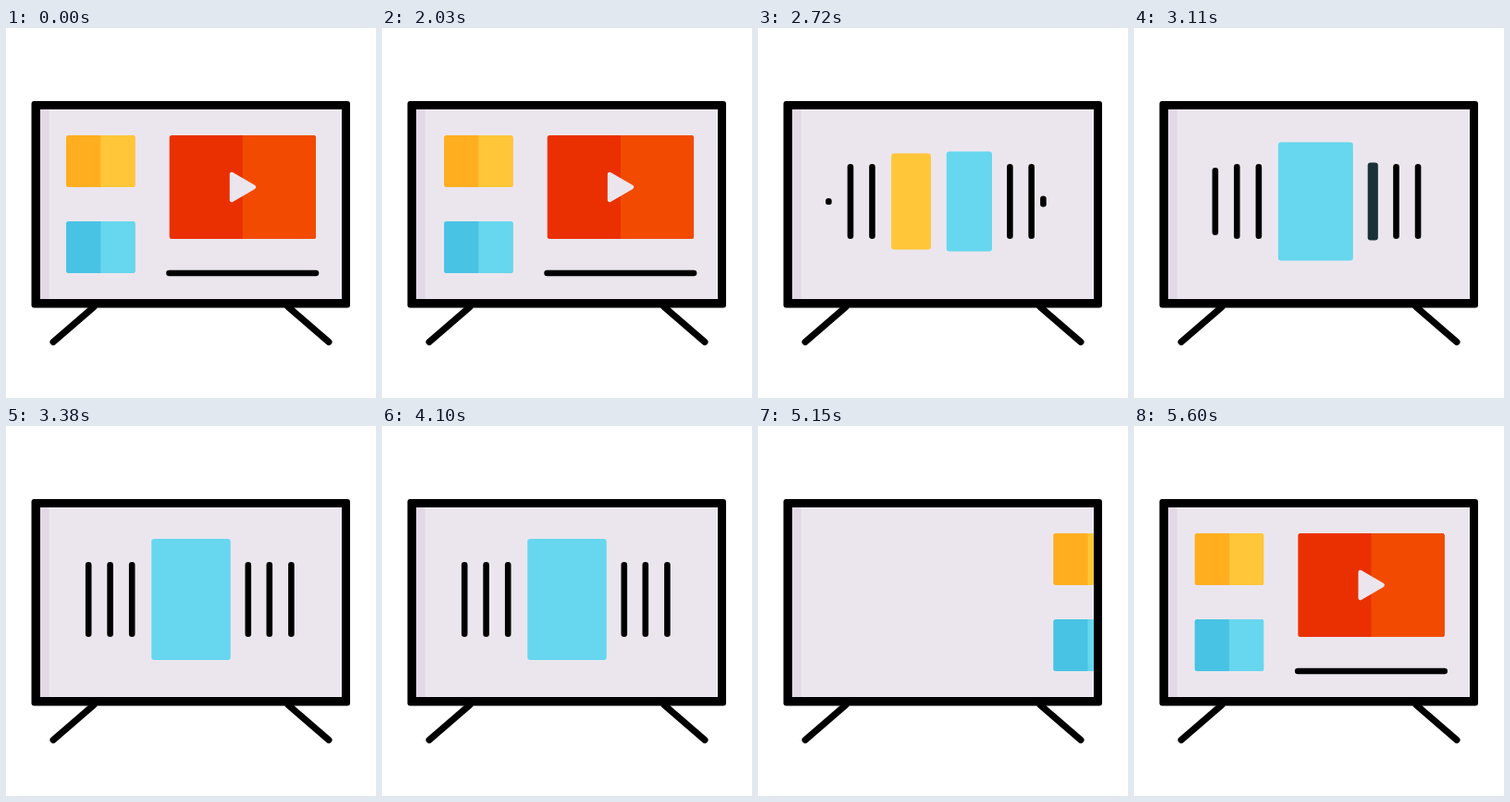
These frames come from a looping animation (400 px wide and 400 px high, 5630 ms). An HTML page:

```html
<!DOCTYPE html>
<html lang="en">
<head>
<meta charset="utf-8">
<title>TV menu</title>
<style>
html, body { margin: 0; width: 100%; height: 100%; overflow: hidden; background: #fff; }
svg { display: block; width: 100%; height: 100%; }
</style>
</head>
<body>
<svg viewBox="0 0 400 400">
  <defs>
    <clipPath id="screen"><rect x="37" y="88" width="326" height="205"/></clipPath>
  </defs>
  <path d="M95 301.5L51 339.5M305 301.5L349 339.5" stroke="#000" stroke-width="7" stroke-linecap="round"/>
  <rect x="27.5" y="79" width="344.5" height="223.5" rx="3"/>
  <rect x="37" y="88" width="326" height="205" fill="#ebe6ee"/>
  <rect x="37" y="88" width="9.5" height="205" fill="#e2d8e6"/>
  <g clip-path="url(#screen)">
    <g id="grid">
      <line x1="176.5" y1="265" x2="335" y2="265" stroke="#000" stroke-width="6.6" stroke-linecap="round"/>
      <path d="M244 158L268 172L244 186Z" fill="#ebe6ee" stroke="#ebe6ee" stroke-width="4.4" stroke-linejoin="round"/>
    </g>
    <g id="carousel"></g>
  </g>
</svg>
<script>
const LOOP = 5630;
const YELLOW = [255, 198, 57], BLUE = [102, 215, 238];
const SLOTS = [65.5, 89.2, 112.6, 136.2, 200, 261.8, 284.8, 308.4, 308.4];
const CENTER = 4, MID_Y = 187.5;
const LINE = { w: 6.6, h: 81 }, CARD = { w: 85.5, h: 131 };
const SCROLLS = [2555, 3065, 3575, 4295], SCROLL_TIME = 315;

const grid = document.getElementById("grid");
const carousel = document.getElementById("carousel");

function add(parent, tag, attrs, first) {
  const el = document.createElementNS("http://www.w3.org/2000/svg", tag);
  set(el, attrs);
  parent.insertBefore(el, first ? parent.firstChild : null);
  return el;
}
function set(el, attrs) {
  for (const k in attrs) el.setAttribute(k, attrs[k]);
}
const clamp = v => Math.min(1, Math.max(0, v));
const mix = (a, b, p) => a + (b - a) * p;
const ramp = (t, start, span) => clamp((t - start) / span);
const smooth = p => p * p * (3 - 2 * p);
const easeIn = p => p * p;
const easeOut = p => 1 - (1 - p) * (1 - p);

// Two-tone tile: dark full tile with a lighter right half
function tile(x, y, w, h, dark, light) {
  const m = x + w / 2, r = x + w, b = y + h;
  add(grid, "path", { fill: light, d: `M${m} ${y}H${r - 2.5}q2.5 0 2.5 2.5V${b - 2.5}q0 2.5 -2.5 2.5H${m}Z` }, true);
  add(grid, "rect", { x, y, width: w, height: h, rx: 2.5, fill: dark }, true);
}
tile(65, 116, 74.5, 56, "#ffae20", "#ffc639");
tile(65, 209, 74.5, 56, "#48c3e4", "#66d7ee");
tile(176.7, 116, 158.3, 112, "#ea3000", "#f24b00");

const bars = Array.from({ length: 8 }, () => add(carousel, "rect", {}));

function drawBar(el, x, w, h, fill) {
  set(el, { x: x - w / 2, y: MID_Y - h / 2, width: w, height: h, rx: Math.min(3.2, w / 2), fill });
}

function drawCarousel(t) {
  let n = 0;
  while (n < SCROLLS.length - 1 && t >= SCROLLS[n + 1]) n++;
  const p = smooth(ramp(t, SCROLLS[n], SCROLL_TIME));
  bars.forEach((el, i) => {
    const slot = i + 1;
    const x = mix(SLOTS[slot], SLOTS[slot - 1], p);
    const open = clamp(1 - Math.abs(slot - p - CENTER));
    const tone = n === 0 && slot === CENTER ? YELLOW : BLUE;
    const tint = clamp(open * 4);
    let h = mix(LINE.h, CARD.h, open);
    let grow = 1;
    if (i === 0) grow = 1 - p / 0.545;
    if (i === 7) grow = (p - 0.506) / 0.494;
    if (i === 0 || i === 7) h = mix(LINE.w, LINE.h, clamp(grow));
    el.style.display = grow > 0 ? "" : "none";
    drawBar(el, x, mix(LINE.w, CARD.w, open), h, `rgb(${tone.map(c => Math.round(c * tint))})`);
  });
}

function draw(t) {
  const gridX = t < 3000
    ? 330 * easeIn(ramp(t, 2005, 330))
    : 330 * (1 - easeOut(ramp(t, 5085, 540)));
  const rowY = t < 3000
    ? 175 * (1 - easeOut(ramp(t, 2270, 285)))
    : -175 * easeIn(ramp(t, 4720, 380));
  grid.setAttribute("transform", `translate(${gridX} 0)`);
  carousel.setAttribute("transform", `translate(0 ${rowY})`);
  drawCarousel(t);
}

const begin = performance.now();
function tick() {
  draw((performance.now() - begin) % LOOP);
  requestAnimationFrame(tick);
}
tick();
</script>
</body>
</html>
```
